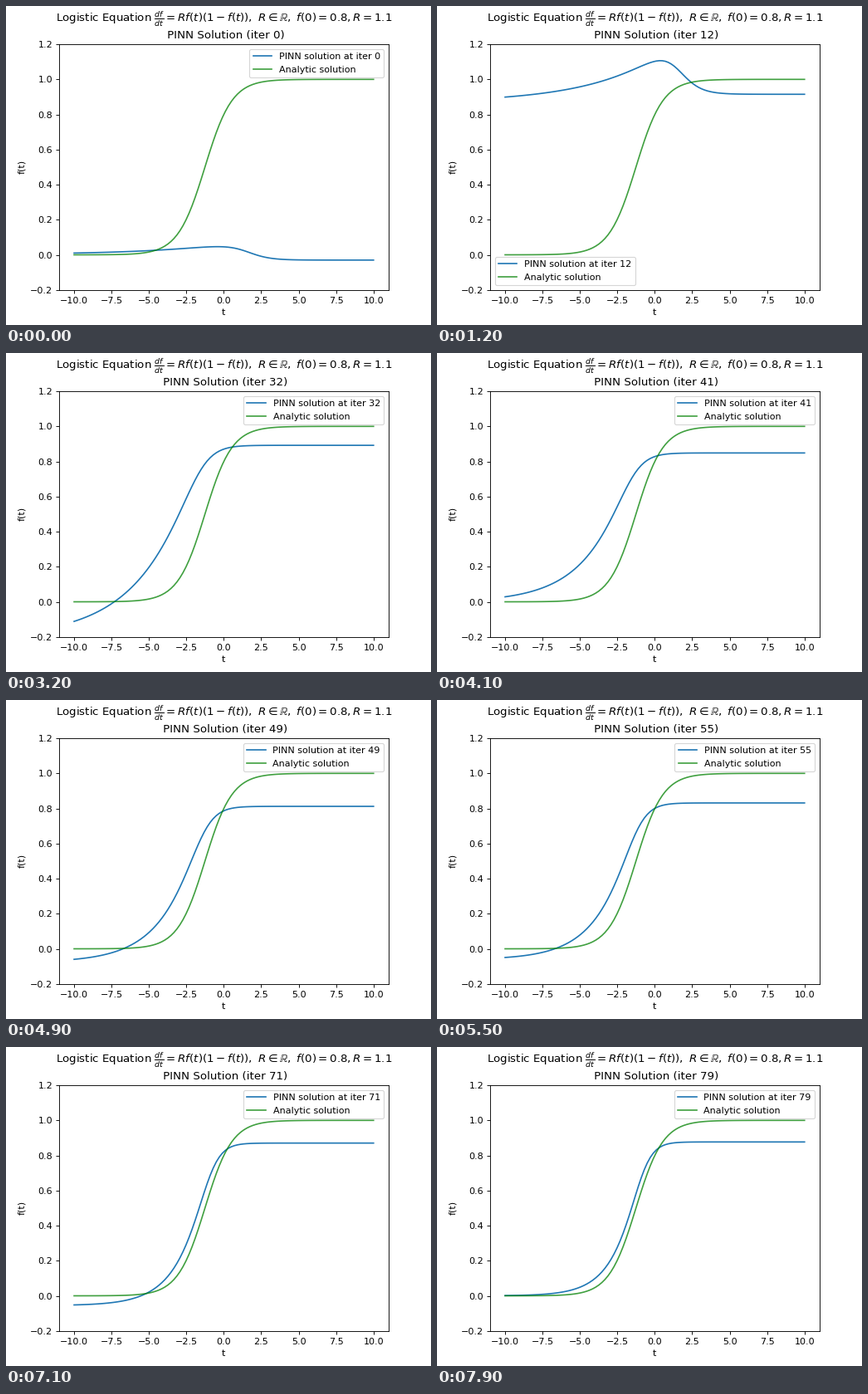
A matplotlib script that plays this animation: 512 by 384 pixels, repeating every 8 s.

```python
import numpy as np
import matplotlib.pyplot as plt
from matplotlib.animation import FuncAnimation

N_ITER = 80
EQUATION = (r"Logistic Equation $\frac{df}{dt}=Rf(t)(1-f(t)),~R\in\mathbb{R},"
            r"~f(0)=0.8,R=1.1$")

# Key points over the training iterations
LOW = {0: .002, 10: .925, 12: .866, 21: .32, 32: 0, 79: 0}
HIGH = {0: -.03, 10: .975, 12: .915, 21: .653, 32: .892, 49: .812, 62: .861, 79: .877}
CENTER = {0: .8, 12: 2.5, 21: .6, 32: -1.55, 49: -1.38, 62: -1.05, 79: -.88}
RATE = {0: 1, 21: .1, 32: .29, 49: .456, 62: .53, 79: .70}
BUMP = {0: .06, 12: .24, 21: .05, 32: 0, 79: 0}


def ease(keys, x):
    """Monotone cubic through {position: value}, evaluated at x."""
    k, v = np.array(list(keys), float), np.array(list(keys.values()), float)
    h = np.diff(k)
    d = np.diff(v) / h
    same = d[:-1] * d[1:] > 0
    total = np.where(same, d[:-1] + d[1:], 1)
    inner = np.where(same, 2 * d[:-1] * d[1:] / total, 0)
    m = np.concatenate([d[:1], inner, d[-1:]])
    i = int(np.clip(np.searchsorted(k, x, "right") - 1, 0, len(h) - 1))
    s = (x - k[i]) / h[i]
    return ((1 + 2 * s) * (1 - s) ** 2 * v[i] + s * s * (3 - 2 * s) * v[i + 1]
            + h[i] * s * (1 - s) * ((1 - s) * m[i] - s * m[i + 1]))


def dip(n):
    """Fading swings of the left end below zero."""
    if n < 25:
        return 0
    wave = (1 + np.cos(2 * np.pi * (n - 34) / 18)) / 2
    return 0.245 * 2 ** ((34 - n) / 18) * wave ** 2


def network(n, t):
    """Skewed logistic step plus a bump that falls off after t = 0."""
    low, high = ease(LOW, n) - dip(n), ease(HIGH, n)
    steep = 1.15 + 0.0095 * n
    step = (1 + np.exp(-steep * (t - ease(CENTER, n)))) ** (-ease(RATE, n) / steep)
    bump = np.exp(0.2 * t) / (1 + np.exp(1.5 * (t - 1.5)))
    return low + (high - low) * step + ease(BUMP, n) * bump


t = np.linspace(-10, 10, 100)
analytic = 1 / (1 + 0.25 * np.exp(-1.1 * t))

fig, ax = plt.subplots(figsize=(6.4, 4.8), dpi=80)


def draw(n):
    ax.clear()
    ax.plot(t, network(n, t), color="tab:blue", label=f"PINN solution at iter {n}")
    ax.plot(t, analytic, color="green", alpha=0.75, label="Analytic solution")
    ax.set_ylim(-0.2, 1.2)
    ax.set_xlabel("t")
    ax.set_ylabel("f(t)")
    ax.set_title(f"{EQUATION}\n PINN Solution (iter {n})")
    ax.legend(loc="best")


anim = FuncAnimation(fig, draw, frames=N_ITER, interval=100, repeat=True,
                     repeat_delay=0, init_func=lambda: None)
plt.show()
```
